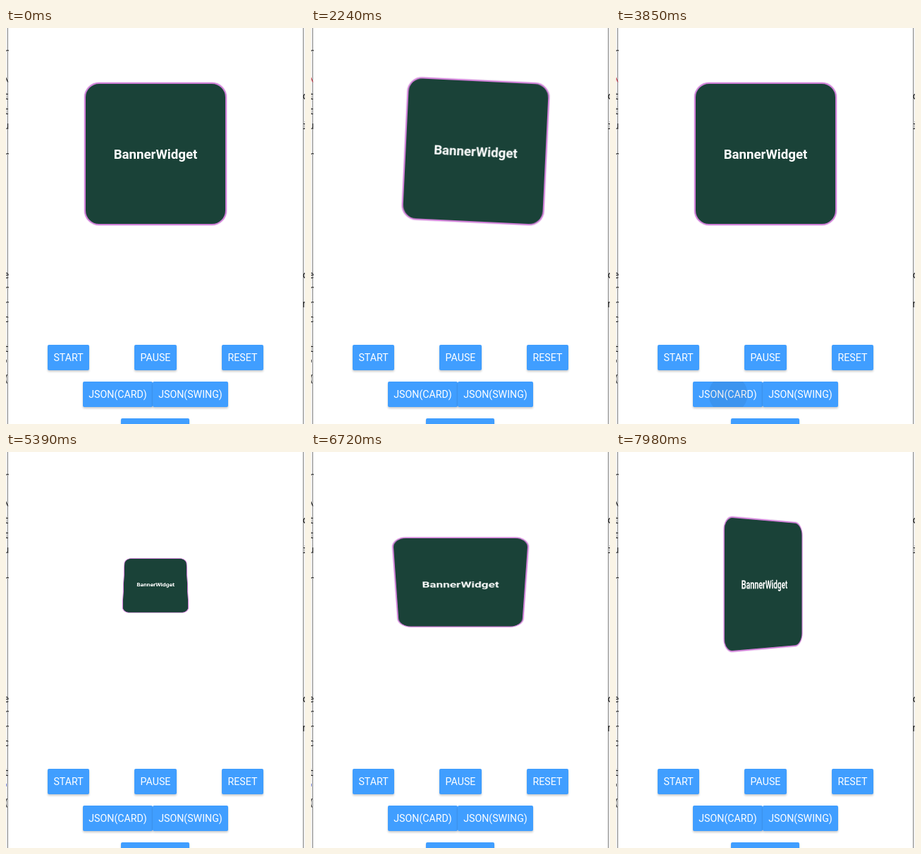
Recreate the animation shown at these times as an HTML page. Size 424 by 560 pixels, loop 8 s.

```html
<!DOCTYPE html>
<html lang="en">
<head>
<meta charset="utf-8">
<style>
html, body { margin: 0; width: 100%; height: 100%; overflow: hidden; background: #fff; }
#stage { position: relative; width: 424px; height: 560px; overflow: hidden; font-family: Roboto, sans-serif; }
#stage > * { position: absolute; box-sizing: border-box; }
.edge { top: 0; width: 3px; height: 560px; background: #eee; }
.left { left: 0; border-right: 1px solid #858585; }
.right { right: 0; border-left: 1px solid #858585; }
.glyph { font: 14px/20px "DejaVu Sans Mono", monospace; color: #222; }
#card {
  left: 111px; top: 77px; width: 202px; height: 202px; border: 2px solid #d080d8; border-radius: 21px;
  background: #1a4238; color: #fff; font-size: 18.7px; font-weight: 700; line-height: 200px;
  text-align: center; box-shadow: 0 0 2px #d9a0df;
}
.button {
  height: 36px; border-radius: 2px; background: #409eff; color: #fff; overflow: hidden;
  font-size: 14.2px; line-height: 37px; text-align: center; white-space: nowrap; box-shadow: 0 2px 3px #0003;
}
.ripple { position: absolute; left: 50%; top: 50%; width: 76px; height: 76px; margin: -38px; border-radius: 50%; background: #123; opacity: 0; }
</style>
</head>
<body>
<div id="stage"><div class="edge left"></div><div class="edge right"></div><div id="card">BannerWidget</div></div>
<script>
const LOOP = 8000;
const stage = document.getElementById('stage');
const card = document.getElementById('card');

function add(parent, className, text, style) {
  const el = document.createElement('div');
  el.className = className;
  el.textContent = text;
  Object.assign(el.style, style);
  return parent.appendChild(el);
}

// Slivers of the page behind the panel
const glyph = (text, x, y) => add(stage, 'glyph', text, {
  left: x + 'px', top: y - 11 + 'px', clipPath: x < 0 ? 'inset(0 0 0 3px)' : 'none'
});
const marks = [['r', 35], ['\\', 71], ['t', 97], ['t', 118], ['u', 139], ['r', 181], ['e', 350],
  ['r', 370], ['r', 391], ['c', 412], ['t', 454], ["'", 475], ['(', 497]]
  .map(([text, y]) => glyph(text, -4, y));
[['c', 97], ['i', 139], ['c', 350], ['n', 391]].forEach(([text, y]) => glyph(text, 420, y));

function button(text, left, top, width) {
  const el = add(stage, 'button', text, { left: left + 'px', top: top + 'px', width: width + 'px' });
  return add(el, 'ripple', '', {});
}
const startRipple = button('START', 59, 447.5, 59);
button('PAUSE', 182, 447.5, 60);
button('RESET', 306, 447.5, 59);
const cardRipple = button('JSON(CARD)', 109, 499.5, 99);
button('JSON(SWING)', 208, 499.5, 107);
button('', 163, 551.5, 97);

// time, x, y, rotate, scale, rotateX, rotateY
const poses = [
  [1400, 0, 0, 0, 1, 0, 0],
  [1540, -48.5, 0, 0, 1, 0, 0],
  [2240, 21.5, -3.7, 2.75, 1, 0, 0],
  [2700, -8, 0, -1, 1, 0, 0],
  [3010, 0, 0, 0, 1, 0, 0],
  [3920, 0, 0, 0, 1, 0, 0],
  [5390, 0, 9.5, 0, 0.453, 32.7, 0],
  [6720, 0, 9.2, 0, 0.921, -47, 0],
  [7210, 0, 9, 0, 0.915, 0, 0],
  [7980, -0.5, 9, 0, 0.908, 0, 52.5]
];

function poseAt(t) {
  const next = poses.findIndex(p => p[0] > t);
  if (next === 0) return poses[0];
  if (next < 0) return poses[poses.length - 1];
  const a = poses[next - 1], b = poses[next];
  const u = (t - a[0]) / (b[0] - a[0]);
  const k = u * u * (3 - 2 * u);
  return a.map((v, i) => v + (b[i] - v) * k);
}

function ripple(el, t, begin) {
  const u = (t - begin) / 400;
  const active = u > 0 && u < 1;
  el.style.opacity = active ? 0.09 * (1 - u * u) : 0;
  el.style.transform = `scale(${active ? 0.5 + 0.6 * u : 0})`;
}

function frame(now) {
  const t = now % LOOP;
  const [, x, y, turn, scale, rx, ry] = poseAt(t);
  card.style.transform = `translate(${x}px, ${y}px) rotate(${turn}deg) scale(${scale}) ` +
    `perspective(1500px) rotateX(${rx}deg) rotateY(${ry}deg)`;
  ripple(startRipple, t, 1330);
  ripple(cardRipple, t, 3700);
  marks[1].style.color = t > 1400 && t < 4700 ? '#c43c4c' : '';
  marks[11].style.color = t > 4700 && t < 7300 ? '#5060c8' : '';
  requestAnimationFrame(frame);
}
requestAnimationFrame(frame);
</script>
</body>
</html>
```
